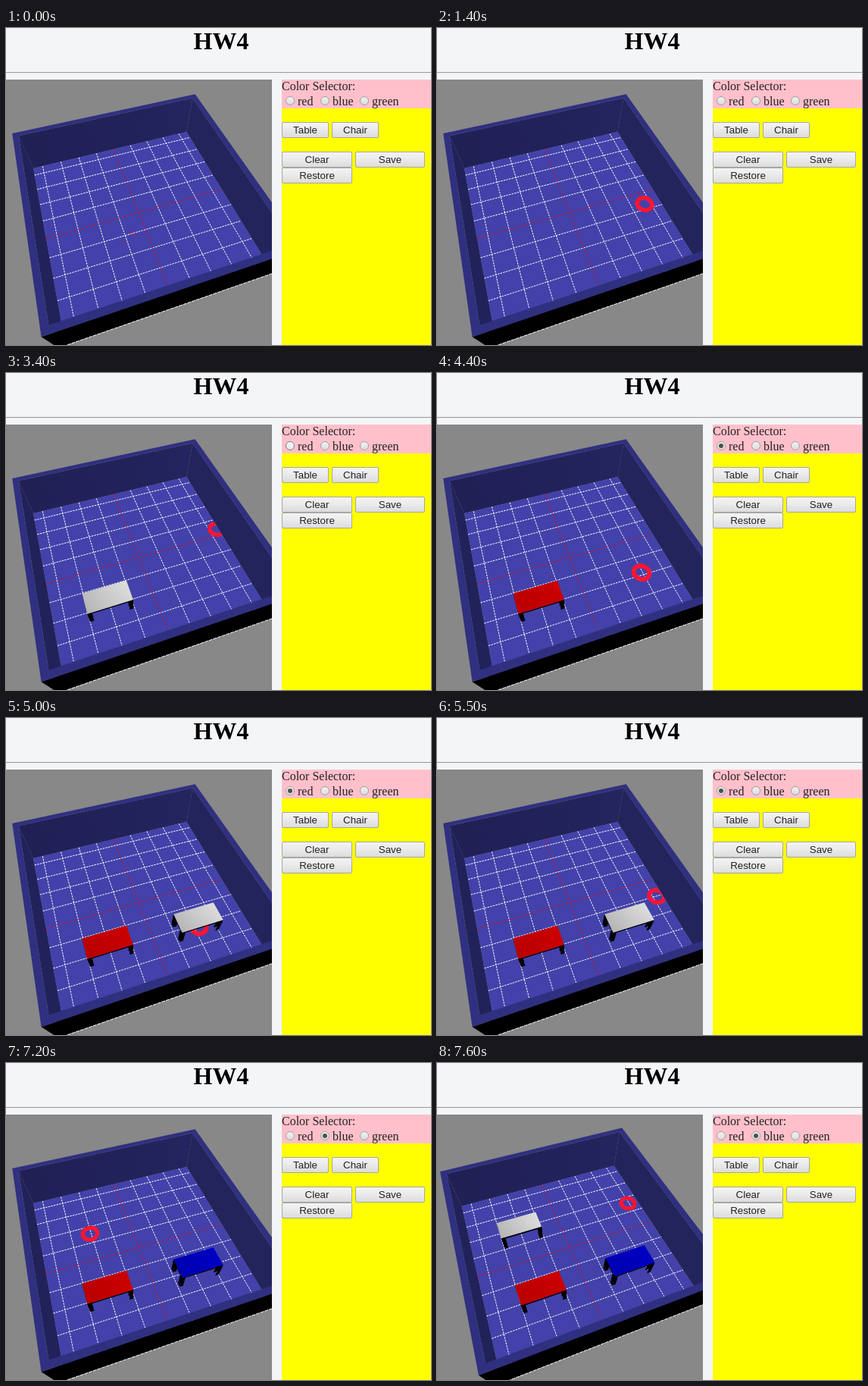
These frames come from a looping animation (561 px wide and 418 px high, 8 s). An HTML page with a canvas:

```html
<!DOCTYPE html>
<html lang="en">
<head>
<meta charset="utf-8">
<title>HW4</title>
<style>
  html, body { margin: 0; width: 100%; height: 100%; overflow: hidden; background: #f4f5f7; }
  #stage { position: relative; width: 561px; height: 418px; overflow: hidden; color: #222;
           font: 16px/18px "Liberation Serif", serif; }
  #stage > * { position: absolute; box-sizing: border-box; margin: 0; white-space: nowrap; }
  h1 { left: 247.5px; top: -1px; font-size: 32px; line-height: 37px; color: #000; }
  .rule { left: 0; top: 58px; width: 561px; height: 2px; background: #9a9a9a; border-bottom: 1px solid #eee; }
  canvas { left: 0; top: 68px; }
  .pink { left: 364px; top: 68px; width: 197px; height: 38px; background: #ffc0cb; }
  .yellow { left: 364px; top: 106px; width: 197px; height: 312px; background: #ff0; }
  .radio { top: 90px; width: 12px; height: 12px; border: 1px solid #a0a0a0; border-radius: 50%;
           background: linear-gradient(#f2f2f2, #dcdcdc); }
  .radio.hover { border-color: #808080; background: linear-gradient(#f8f8f8, #e4e4e4); }
  .radio.on::after { content: ""; position: absolute; left: 2px; top: 2px; width: 6px; height: 6px;
                     border-radius: 50%; background: #505050; }
  .button { height: 21px; border: 1px solid #a6a6a6; border-radius: 2px; text-align: center;
            font: 13.333px/19px "Liberation Sans", sans-serif;
            background: linear-gradient(#f3f3f3, #ededed 38%, #dcdcdc); }
  .button.hover { border-color: #8c8c8c; background: linear-gradient(#f8f8f8, #f1f1f1 38%, #e4e4e4); }
</style>
</head>
<body>
<div id="stage">
  <h1>HW4</h1>
  <div class="rule"></div>
  <canvas id="room" width="351" height="350"></canvas>
  <div class="pink"></div>
  <div class="yellow"></div>
  <span style="left:364px;top:68px">Color Selector:</span>
  <i class="radio" id="red" style="left:369px"></i><span style="left:385px;top:88px">red</span>
  <i class="radio" id="blue" style="left:415px"></i><span style="left:431px;top:88px">blue</span>
  <i class="radio" style="left:467px"></i><span style="left:483px;top:88px">green</span>
  <div class="button" id="table" style="left:364px;top:124px;width:62px">Table</div>
  <div class="button" style="left:430px;top:124px;width:62px">Chair</div>
  <div class="button" style="left:364px;top:163px;width:93px">Clear</div>
  <div class="button" style="left:461px;top:163px;width:92px">Save</div>
  <div class="button" style="left:364px;top:184px;width:93px">Restore</div>
</div>
<script>
const LOOP = 8000, STEP = 100;
const ctx = document.getElementById('room').getContext('2d');
const byId = id => document.getElementById(id);

// Camera orbiting the centre of the floor, which spans -HALF..HALF.
const CX = 175.2, CY = 243.4, FOCAL = 384, DIST = 15.76;
const TILT = 57.2 * Math.PI / 180, SIN = Math.sin(TILT), COS = Math.cos(TILT);
const HALF = 5, OUTER = 5.3, WALL = 2.55, CELL = 2 * HALF / 9;
let turnSin = 0, turnCos = 1;

function setTurn(degrees) {
  turnSin = Math.sin(degrees * Math.PI / 180);
  turnCos = Math.cos(degrees * Math.PI / 180);
}

function project(x, y, z) {
  const side = turnCos * x - turnSin * z, ahead = turnSin * x + turnCos * z;
  const depth = DIST + ahead * COS - y * SIN;
  return [CX + FOCAL * side / depth, CY - FOCAL * (ahead * SIN + y * COS) / depth, FOCAL / depth];
}

// Floor point under a screen position.
function unproject(px, py) {
  const u = px - CX, v = py - CY;
  const k = DIST * SIN / (v * COS + FOCAL * SIN);
  const side = k * u, ahead = k * (FOCAL * COS - v * SIN) - DIST * COS;
  return [turnCos * side + turnSin * ahead, turnCos * ahead - turnSin * side];
}

function trace(points) {
  points.forEach((p, i) => {
    const [x, y] = project(...p);
    i ? ctx.lineTo(x, y) : ctx.moveTo(x, y);
  });
}

function face(color, ...points) {
  ctx.beginPath();
  trace(points);
  ctx.closePath();
  ctx.fillStyle = color;
  ctx.fill();
}

function line(color, dash, a, b) {
  ctx.beginPath();
  trace([a, b]);
  ctx.setLineDash(dash);
  ctx.lineWidth = 1;
  ctx.strokeStyle = color;
  ctx.stroke();
  ctx.setLineDash([]);
}

const square = (r, y) => [[-r, y, r], [r, y, r], [r, y, -r], [-r, y, -r]];

function drawInside() {
  const low = square(HALF, 0), high = square(HALF, WALL);
  const shade = ctx.createLinearGradient(20, 140, 240, 130);
  shade.addColorStop(0, '#202055');
  shade.addColorStop(1, '#24245e');
  face(shade, low[0], low[1], high[1], high[0]);
  face('#24245c', low[1], low[2], high[2], high[1]);
  face('#22225a', low[3], low[0], high[0], high[3]);
  face('#4242aa', ...low);
  for (let i = -4; i <= 4; i++) {
    const at = i * CELL;
    const color = i ? '#fff' : '#f00', dash = i ? [2.5, 1.2] : [2.5, 3];
    line(color, dash, [at, 0, HALF], [at, 0, -HALF]);
    line(color, dash, [-HALF, 0, at], [HALF, 0, at]);
  }
}

function drawFront() {
  const low = square(OUTER, 0), high = square(OUTER, WALL);
  face('#000', low[2], low[3], high[3], high[2]);
  line('#fff', [5, 1], low[3], low[2]);
  ctx.beginPath();
  trace(high);
  ctx.closePath();
  trace(square(HALF, WALL));
  ctx.closePath();
  ctx.fillStyle = '#303080';
  ctx.fill('evenodd');
}

function drawRing(px, py) {
  const [x, z] = unproject(px, py);
  ctx.save();
  ctx.beginPath();
  trace(square(HALF, 0));
  ctx.clip();
  ctx.beginPath();
  const circle = Array.from({ length: 33 }, (_, i) => {
    const a = i * Math.PI / 16;
    return [x + 0.41 * Math.cos(a), 0, z + 0.41 * Math.sin(a)];
  });
  trace(circle);
  ctx.closePath();
  ctx.lineWidth = 0.23 * project(x, 0, z)[2];
  ctx.strokeStyle = '#ff1432';
  ctx.stroke();
  ctx.restore();
}

const PAINT = {
  white: ['#b4b4b4', '#dedede'],
  red: ['#b80000', '#cc0000'],
  blue: ['#0000b0', '#0000c4']
};

function drawTable(x, z, paint) {
  const w = 1.075, d = 0.53, top = 1, under = 0.88, leg = 0.19;
  for (const sz of [1, -1]) for (const sx of [-1, 1]) {
    const ax = x + sx * w, bx = ax - sx * leg, az = z + sz * d, bz = az - sz * leg;
    face('#000', [ax, under, az], [bx, under, az], [bx, 0, az], [ax, 0, az]);
    face('#000', [ax, under, az], [ax, under, bz], [ax, 0, bz], [ax, 0, az]);
    face('#000', [bx, under, bz], [ax, under, bz], [ax, 0, bz], [bx, 0, bz]);
  }
  const rect = y => [[x - w, y, z + d], [x + w, y, z + d], [x + w, y, z - d], [x - w, y, z - d]];
  const upper = rect(top), lower = rect(under);
  face('#000', upper[3], upper[2], lower[2], lower[3]);
  face('#000', upper[0], upper[3], lower[3], lower[0]);
  const a = project(...upper[3]), b = project(...upper[1]);
  const shade = ctx.createLinearGradient(a[0], a[1], b[0], b[1]);
  PAINT[paint].forEach((c, i) => shade.addColorStop(i, c));
  face(shade, ...upper);
}

// Ring path: time, screen x, screen y.
const PATH = [
  [1400, 274, 232], [1600, 190, 280], [1800, 127, 307], [2000, 135, 307],
  [2200, 135, 307], [2400, 215, 258], [2600, 278, 206], [4300, 278, 206],
  [4400, 270, 263], [4600, 247, 272], [4800, 254, 275], [5000, 254, 275],
  [5200, 290, 235], [6400, 290, 235], [6600, 240, 196], [6700, 190, 183],
  [6800, 140, 188], [7000, 85, 213], [7200, 111, 225], [7400, 111, 225],
  [7600, 252, 185], [LOOP, 252, 185]
];

function ringAt(t) {
  const i = PATH.findIndex(p => p[0] > t);
  if (i < 1) return null;
  const [t0, x0, y0] = PATH[i - 1], [t1, x1, y1] = PATH[i];
  const k = (t - t0) / (t1 - t0);
  return [x0 + (x1 - x0) * k, y0 + (y1 - y0) * k];
}

const during = (t, a, b) => t >= a && t < b;

function render(t) {
  byId('table').classList.toggle('hover',
    during(t, 500, 1300) || during(t, 3900, 4100) || during(t, 5400, 5500));
  byId('red').classList.toggle('hover', during(t, 3400, 3500));
  byId('red').classList.toggle('on', during(t, 3500, 6200));
  byId('blue').classList.toggle('hover', during(t, 6100, 6200));
  byId('blue').classList.toggle('on', t >= 6200);

  setTurn(18.5 + (t >= 7600 ? 2 : t >= 7500 ? 1 : 0));
  ctx.setTransform(1, 0, 0, 1, 0, -68);
  ctx.fillStyle = '#888';
  ctx.fillRect(0, 68, 351, 350);
  drawInside();
  const ring = ringAt(t);
  if (ring) drawRing(...ring);
  else if (t < 1300) {
    ctx.fillStyle = '#f00';
    for (const [x, y] of [[154, 282], [164, 269], [168, 271]]) ctx.fillRect(x, y, 2, 2);
  }
  if (t >= 7400) drawTable(-2.23, 1.67, 'white');
  if (t >= 2200) drawTable(-2.25, -2.18, t < 3500 ? 'white' : 'red');
  if (t >= 5000) drawTable(2.27, -2.32, t < 6200 ? 'white' : 'blue');
  drawFront();
}

const start = performance.now();
function tick() {
  const t = (performance.now() - start) % LOOP;
  render(Math.floor(t / STEP) * STEP);
  requestAnimationFrame(tick);
}
tick();
</script>
</body>
</html>
```
